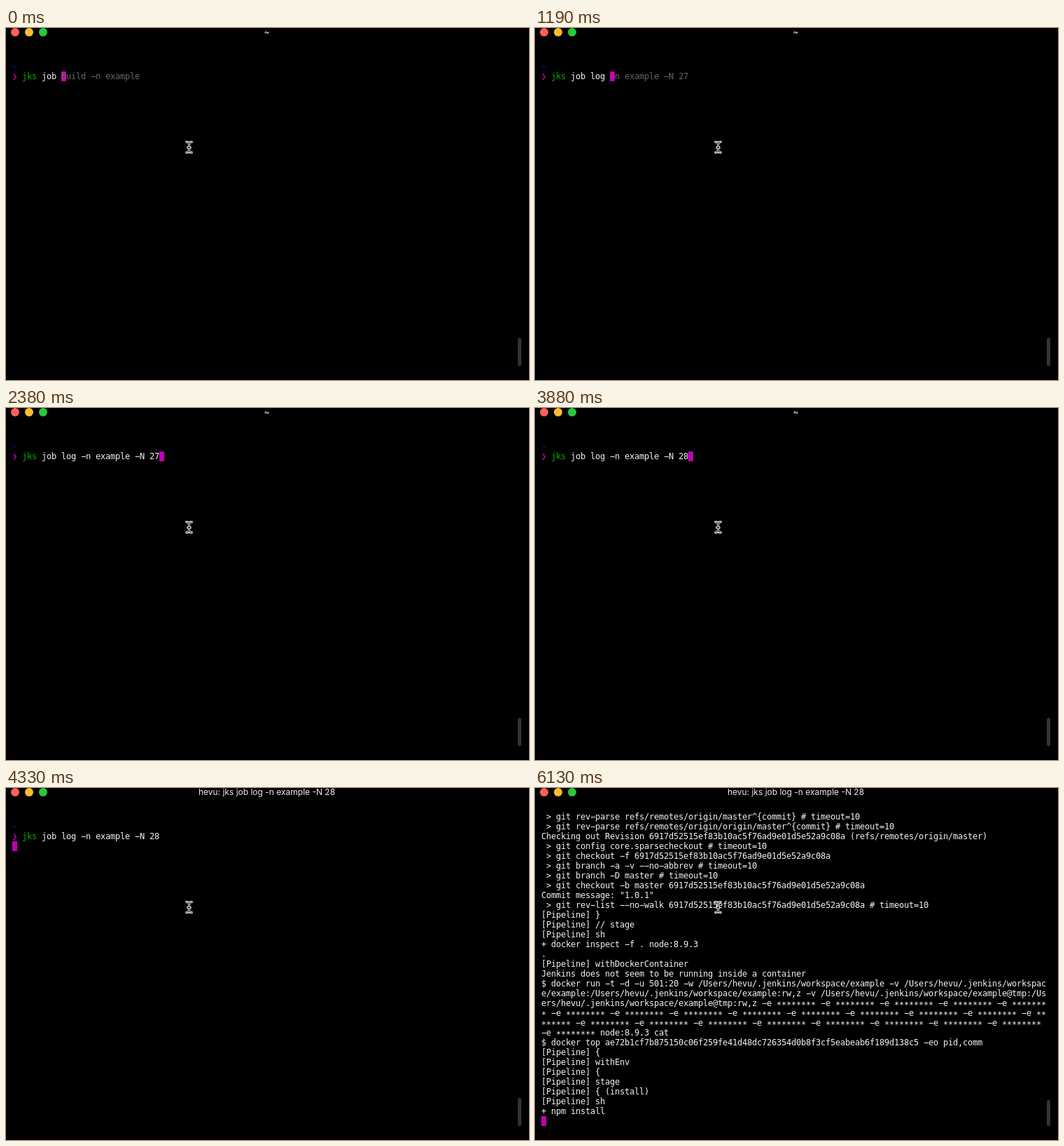
Write an HTML page with a canvas that moves like this. It is 747 px wide and 502 px high and loops after 8 s.

```html
<!DOCTYPE html>
<html lang="en">
<head>
<meta charset="utf-8">
<title>Terminal</title>
<style>
  html, body { margin: 0; width: 100%; height: 100%; overflow: hidden; background: #000; }
  canvas { display: block; }
</style>
</head>
<body>
<canvas id="stage" width="747" height="502"></canvas>
<script>
const ctx = document.getElementById('stage').getContext('2d');
const LOOP = 8000, CW = 7, CH = 14, LEFT = 9, TOP = 34, COLS = 103;
const WHITE = '#f4f4f4', GREY = '#686868', GREEN = '#00b200', BLUE = '#0a14b8',
      MAGENTA = '#c000b4', CYAN = '#00a9b2', RED = '#c01a10';
const MONO = '12px "DejaVu Sans Mono", monospace';
const USER = 'hevu';
const TITLE = USER + ': jks job log -n example -N 28';
const COMMAND = 'job log -n example -N 2';

// Time, typed text, dim suggestion; the block cursor stands between them.
const typing = [
  [0, 'job ', 'build -n example'],
  [140, 'job l', 'og -n example -N 27'],
  [290, 'job lo', 'g -n example -N 27'],
  [440, 'job log', ' -n example -N 27'],
  [1190, 'job log ', '-n example -N 27'],
  [2380, COMMAND + '7', ''],
  [3430, COMMAND, '7'],
  [3880, COMMAND + '8', '']
];
const ENTER = 4330, GREET = 5380, LOG = 6130;

const bar = '─'.repeat(26);
const greeting = [
  '   ╭━━━━━━╮',
  '   ┃      ┃',
  '   ┃   ╭━╮┻╮        ╭' + bar + '╮',
  '       ┃▮┃▮┃        │      Welcome to JKS!     │',
  '  ╭┻   ╰━┻━━╮       ╰' + bar + '╯',
  '  ╰┳  ╭━━━━┳╯      /',
  '   ┃  ┃ ╰━━┫',
  '      ┏━┓'
];

const hash = '6917d52515ef83b10ac5f76ad9e01d5e52a9c08a';
const work = `/Users/${USER}/.jenkins/workspace/example`;
const run = `$ docker run -t -d -u 501:20 -w ${work} -v ${work}:${work}:rw,z` +
  ` -v ${work}@tmp:${work}@tmp:rw,z ` + '-e ******** '.repeat(23) + 'node:8.9.3 cat';
const log = ` > git rev-parse refs/remotes/origin/master^{commit} # timeout=10
 > git rev-parse refs/remotes/origin/origin/master^{commit} # timeout=10
Checking out Revision ${hash} (refs/remotes/origin/master)
 > git config core.sparsecheckout # timeout=10
 > git checkout -f ${hash}
 > git branch -a -v --no-abbrev # timeout=10
 > git branch -D master # timeout=10
 > git checkout -b master ${hash}
Commit message: "1.0.1"
 > git rev-list --no-walk ${hash} # timeout=10
[Pipeline] }
[Pipeline] // stage
[Pipeline] sh
+ docker inspect -f . node:8.9.3
.
[Pipeline] withDockerContainer
Jenkins does not seem to be running inside a container
${run}
$ docker top ae72b1cf7b875150c06f259fe41d48dc726354d0b8f3cf5eabeab6f189d138c5 -eo pid,comm
[Pipeline] {
[Pipeline] withEnv
[Pipeline] {
[Pipeline] stage
[Pipeline] { (install)
[Pipeline] sh
+ npm install`.split('\n').flatMap(line => line.match(new RegExp(`.{1,${COLS}}`, 'g')));

const glyphs = { '-': '−', '*': '∗' };  // wide hyphen, centred asterisk
const heavy = { '━': 'lr', '┃': 'ud', '┻': 'lru', '┳': 'lrd', '┫': 'lud', '┏': 'rd', '┓': 'ld' };
const rounded = { '╭': [1, 1], '╮': [-1, 1], '╰': [1, -1], '╯': [-1, -1] };
const arms = { l: [0, 7, 5, 2], r: [3, 7, 4, 2], u: [3, 0, 2, 9], d: [3, 7, 2, 7] };

function box(x, y, w, h, color) {
  ctx.fillStyle = color;
  ctx.fillRect(x, y, w, h);
}

function stroke(path, color, width) {
  ctx.strokeStyle = color;
  ctx.lineWidth = width;
  ctx.stroke(new Path2D(path));
}

function cell(ch, x, y, color) {
  if (heavy[ch]) {
    for (const arm of heavy[ch]) {
      const [dx, dy, w, h] = arms[arm];
      box(x + dx, y + dy, w, h, color);
    }
  } else if (rounded[ch]) {
    const [h, v] = rounded[ch], cx = x + 3.5, cy = y + 7.5;
    stroke(`M${cx} ${v > 0 ? y + CH : y}V${cy + 3 * v}Q${cx} ${cy} ${cx + 3 * h} ${cy}H${h > 0 ? x + CW : x}`, color, 1);
  } else if (ch === '─') box(x, y + 7, CW, 1, color);
  else if (ch === '│') box(x + 3, y, 1, CH, color);
  else if (ch === '▮') box(x, y + 2, 5, 11, color);
  else if (ch !== ' ') {
    ctx.fillStyle = color;
    ctx.fillText(glyphs[ch] || ch, x, y + 11);
  }
}

function print(text, col, row, color = WHITE) {
  [...text].forEach((ch, i) => cell(ch, LEFT + (col + i) * CW, TOP + row * CH, color));
}

function cursor(col, row) {
  box(LEFT + col * CW, TOP + row * CH, CW, CH, MAGENTA);
}

function pill(y, h) {
  ctx.fillStyle = '#343434';
  ctx.beginPath();
  ctx.roundRect(731, y, 5, h, 2.5);
  ctx.fill();
}

function titleBar(text) {
  ['#ff5f57', '#febc2e', '#28c840'].forEach((color, i) => {
    ctx.fillStyle = color;
    ctx.beginPath();
    ctx.arc(13 + 20 * i, 6, 6, 0, 7);
    ctx.fill();
  });
  ctx.font = '12px Inter, sans-serif';
  ctx.textAlign = 'center';
  ctx.fillStyle = '#ececec';
  ctx.fillText(text, 372.5, 9.5);
  ctx.textAlign = 'left';
}

function pointer() {
  const shape = 'M258 162.5Q261.5 162.5 261.5 165.5Q261.5 162.5 265 162.5' +
    'M261.5 165V175M258 177.5Q261.5 177.5 261.5 174.5Q261.5 177.5 265 177.5M260 170.5H263';
  ctx.lineCap = 'square';
  stroke(shape, '#fff', 3);
  stroke(shape, '#000', 1);
  ctx.lineCap = 'butt';
}

function prompt(typed, rest) {
  print('~', 0, 1, BLUE);
  print('❯', 0, 2, MAGENTA);
  print('jks', 2, 2, GREEN);
  print(typed, 6, 2);
  if (rest !== undefined) {
    cursor(6 + typed.length, 2);
    print(rest, 6 + typed.length, 2, GREY);
  }
}

function greet() {
  greeting.forEach((line, i) => print(line, 0, 4 + i));
  stroke('M30 146L37 132L44 146', RED, 1);
  print('Hevu', 14, 10, CYAN);
  cursor(0, 13);
}

function draw(t) {
  box(0, 0, 747, 502, '#000');
  titleBar(t < ENTER ? '~' : TITLE);
  ctx.font = MONO;
  if (t < ENTER) {
    const [, typed, rest] = typing.findLast(step => step[0] <= t);
    prompt(typed, rest);
  } else if (t < LOG) {
    prompt(COMMAND + '8');
    if (t < GREET) cursor(0, 3);
    else greet();
  } else {
    log.forEach((line, row) => print(line, 0, row));
    cursor(0, log.length);
  }
  if (t < LOG) pill(442, 40);
  else pill(445, 37);
  pointer();
}

const start = performance.now();
function tick() {
  draw((performance.now() - start) % LOOP);
  requestAnimationFrame(tick);
}
tick();
</script>
</body>
</html>
```
